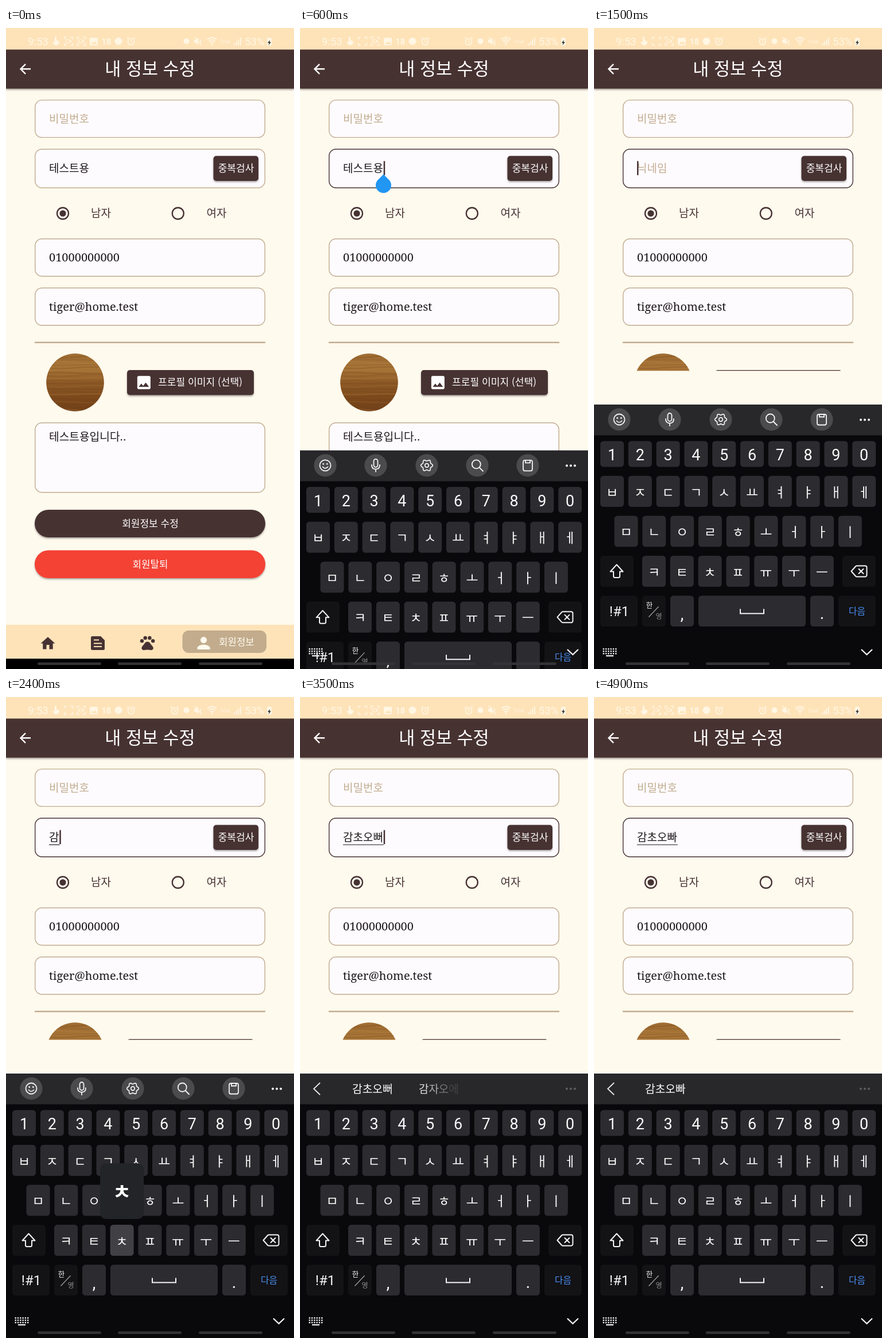
An HTML page for the animation above (5 s loop, 502 by 1115 pixels).

```html
<!DOCTYPE html>
<html lang="ko">
<head>
<meta charset="utf-8">
<title>내 정보 수정</title>
<style>
html, body { margin: 0; width: 100%; height: 100%; overflow: hidden; background: #fffaee; }
svg { display: block; width: 100%; height: 100%; }
text { font-family: "Noto Sans CJK KR", "Noto Sans CJK", sans-serif; font-weight: 500; white-space: pre; }
.num { font-family: Roboto, sans-serif; font-weight: 400; }
.serif { font-family: "Noto Serif", serif; font-weight: 400; }
.key { font-weight: 400; }
</style>
</head>
<body>
<svg id="stage" viewBox="0 0 502 1115">
<defs>
  <filter id="soft" x="-10%" y="-30%" width="120%" height="170%">
    <feDropShadow dx="0" dy="2" stdDeviation="1.8" flood-color="#000" flood-opacity=".35"/>
  </filter>
  <linearGradient id="wood" x2="0" y2="1">
    <stop offset="0" stop-color="#9c6a30"/><stop offset=".25" stop-color="#a87538"/>
    <stop offset=".5" stop-color="#8d5a26"/><stop offset=".75" stop-color="#7d4a1c"/>
    <stop offset="1" stop-color="#704019"/>
  </linearGradient>
  <clipPath id="disc"><circle cx="120.5" cy="616.5" r="50.3"/></clipPath>
  <clipPath id="body"><rect id="bodyRect" y="0" width="502" height="1115"/></clipPath>
</defs>
</svg>
<script>
const LOOP = 5000, STEP = 100;
const BROWN = '#463233', TAN = '#c1ac8f', SAND = '#fee3b9', PALE = '#fff6e4', INK = '#1c1819';
const KEY = '#2c2b2f', DARK = '#131215', LIT = '#414045';
const stage = document.getElementById('stage');
const $ = id => document.getElementById(id);

const rect = (x, y, w, h, r, fill, more = '') =>
  `<rect x="${x}" y="${y}" width="${w}" height="${h}" rx="${r}" fill="${fill}" ${more}/>`;
const circle = (x, y, r, fill, more = '') => `<circle cx="${x}" cy="${y}" r="${r}" fill="${fill}" ${more}/>`;
const line = (d, color, w = 2, more = '') =>
  `<path d="${d}" fill="none" stroke="${color}" stroke-width="${w}" ${more}/>`;
const shape = (d, fill, more = '') => `<path d="${d}" fill="${fill}" ${more}/>`;
// Text placed by the middle of its glyphs
const text = (x, cy, s, size, fill, more = '') =>
  `<text x="${x}" y="${cy + size * .37}" font-size="${size}" fill="${fill}" ${more}>${s}</text>`;
const mid = (x, cy, s, size, fill, more = '') => text(x, cy, s, size, fill, 'text-anchor="middle" ' + more);
const group = (x, y, k, inner) => `<g transform="translate(${x} ${y}) scale(${k})">${inner}</g>`;
const ROUND = 'stroke-linecap="round" stroke-linejoin="round"';

function form() {
  const field = (y, h, id = '') =>
    rect(50.7, y, 400.6, h, 12, '#fefbff', `stroke="${TAN}" stroke-width="1.4" id="${id}"`);
  const button = (x, y, w, h, r, fill) => rect(x, y, w, h, r, fill, 'filter="url(#soft)"');
  const radio = (x, on) => circle(x, 322.5, 10, 'none', `stroke="${BROWN}" stroke-width="2.3"`) +
    (on ? circle(x, 322.5, 5.6, BROWN) : '');
  let grain = '';
  for (let i = 0; i < 22; i++) {
    const y = 568 + i * 4.6, bend = 3 * Math.sin(i * 1.7);
    grain += line(`M70 ${y} q25 ${bend} 50 0 t52 ${-bend / 2}`, i % 3 ? '#6b3d16' : '#b9854a',
      1 + i % 2, 'opacity=".28"');
  }
  return `<g clip-path="url(#body)">` +
    field(125.4, 65) + text(75, 157.5, '비밀번호', 19, TAN) +
    field(210.8, 67.2, 'nickBox') +
    `<g id="nick"></g>` +
    button(361.5, 222.5, 78.5, 43.5, 5, BROWN) + mid(401, 244, '중복검사', 17, '#fff') +
    radio(99, true) + text(148, 322, '남자', 19, BROWN) +
    radio(299.8) + text(349.5, 322, '여자', 19, BROWN) +
    field(366.8, 65) + text(75, 399, '01000000000', 20, INK, 'class="serif"') +
    field(452.3, 65) + text(75, 484.5, 'tiger@home.test', 20, INK, 'class="serif"') +
    line('M50 547H452', TAN, 2.6) +
    circle(120.5, 616.5, 50.3, 'url(#wood)') + `<g clip-path="url(#disc)">${grain}</g>` +
    button(211, 595, 221, 43.5, 5, BROWN) +
    group(225, 601.3, 1.28, rect(3, 3, 18, 18, 2, '#fff') + shape('M5 18l3.5-4.5 2.5 3 3.5-4.5 4.5 6z', BROWN)) +
    text(265, 616, '프로필 이미지 (선택)', 17.1, '#fff') +
    field(686.8, 121) + text(75, 711, '테스트용입니다..', 19.2, INK) +
    button(50, 838, 402, 48, 24, BROWN) + mid(251.5, 862, '회원정보 수정', 17, '#fff') +
    button(50, 908.5, 402, 48.5, 24, '#f44336') + mid(251.5, 932.5, '회원탈퇴', 16.8, '#fff') +
    `</g>` +
    `<g id="handle">${shape('M145.5 254.4L155 264A13.5 13.5 0 1 1 136 264Z', '#2196f3')}</g>`;
}

function tabs() {
  const paw = [[4.5, 9.5], [9, 5.5], [15, 5.5], [19.5, 9.5]].map(p => circle(...p, 2.5, BROWN)).join('') +
    shape('M12 10.5c3 0 3.600 2.400 5.300 4.300s2.900 3 2.600 4.900c-.6 2.100-2 2.500-4 2.200q-3.900-.7-7.800 0c-2 .3-3.400-.1-4-2.200c-.3-1.900 .9-3 2.600-4.900s2.300-4.300 5.300-4.300z', BROWN);
  return `<g id="tabs">` + rect(0, 1038, 502, 59, 0, SAND) +
    group(58, 1055.4, 1.25, shape('M10 20v-6h4v6h5v-8h3L12 3 2 12h3v8z', BROWN)) +
    shape('M150.500 1058H165l7 7v14.500a2.500 2.500 0 0 1-2.500 2.500h-19a2.500 2.500 0 0 1-2.500-2.500v-19a2.500 2.500 0 0 1 2.500-2.500z', BROWN) +
    line('M153 1064.500h9M153 1070.500h14M153 1076h14', SAND, 2.2) +
    group(231.2, 1054, 1.28, paw) +
    rect(307.5, 1048, 146.5, 39, 11, '#c2ac8d') +
    group(328, 1053.5, 1.38, circle(12, 8, 4, '#fffaee') + shape('M4 20v-2c0-2.700 5.300-4 8-4s8 1.300 8 4v2z', '#fffaee')) +
    text(371, 1067.5, '회원정보', 16.8, '#fffaee') + rect(0, 1097, 502, 18, 0, '#000') + `</g>`;
}

function header() {
  const frame = x => line(`M${x - 7} 20v-4h4M${x + 3} 16h4v4M${x + 7} 26v4h-4M${x - 3} 30h-4v-4`, PALE, 1.4);
  const cam = x => rect(x - 4, 20, 6, 6, 1, 'none', `stroke="${PALE}" stroke-width="1.2"`) +
    shape(`M${x + 2} 23l3-2v4z`, PALE);
  const alarm = x => circle(x, 24, 5.5, 'none', `stroke="${PALE}" stroke-width="1.6"`) +
    line(`M${x} 21v3l2 1.500M${x - 7} 19l3-3M${x + 7} 19l-3-3`, PALE, 1.4);
  let bars = '';
  for (let i = 0; i < 4; i++) bars += rect(397 + i * 3.6, 27 - i * 3.4, 2, 3 + i * 3.4, 0, PALE);
  return rect(0, 37, 502, 68.5, 0, BROWN, 'filter="url(#soft)"') + rect(0, 0, 502, 37.5, 0, SAND) +
    text(38, 23.3, '9:53', 18.5, PALE, 'class="num"') +
    shape('M85 16q2-2 3 0v5l4 2q2 2 0 5l-3 2h-4l-4-5 4-1z', PALE) +
    frame(109) + `<g id="rec">${cam(109)}</g>` + frame(131) + cam(131) +
    rect(146, 17, 14, 13, 2, PALE) + shape('M148 28l3.500-4 2.500 2 2-3 3 5z', SAND) +
    text(166.5, 23.5, '18', 14.5, PALE, 'class="num" style="font-weight:700"') +
    circle(196, 23, 6.5, PALE) + alarm(218) +
    `<g id="alarm">${alarm(294)}</g>` + circle(314.5, 23, 5, PALE) +
    shape('M328 20.500h3l4-4v13l-4-4h-3z', PALE) + line('M329 16l12 14M338 20q3 3 0 6', PALE, 1.5) +
    line('M351 20q8-7 16 0M353.500 23q5.500-5 11 0M356 26q3-3 6 0', PALE, 1.8) + circle(359, 28.5, 1.5, PALE) +
    text(373, 23.5, '1/ıııl', 9, PALE, 'class="num"') + bars +
    text(416, 23.3, '53%', 18.5, PALE, 'class="num"') +
    rect(455, 17, 8, 13.5, 2, PALE) + shape('M460 21l-4 5h2.500l-1 4 4.500-5.500h-2.500z', '#333') +
    line('M43 71.300H26M34 62.800l-8.500 8.500 8.500 8.500', '#fff', 2.4) +
    mid(251, 71, '내 정보 수정', 30.5, '#fff');
}

// Keyboard
const PITCH = 48.8;
const keys = {};
const TWIN = { 'ㅂ': 'ㅃ', 'ㅈ': 'ㅉ', 'ㄷ': 'ㄸ', 'ㄱ': 'ㄲ', 'ㅅ': 'ㅆ', 'ㅐ': 'ㅒ', 'ㅔ': 'ㅖ' };

function keyboard() {
  const key = (name, x, y, w, h, fill, inner) => {
    keys[name] = { x: x + w / 2, y, fill };
    return rect(x, y, w, h, 5.5, fill, `id="k${name}"`) + inner;
  };
  const row = (chars, x0, y, h, cls, size) => [...chars].map((c, i) => {
    const x = x0 + i * PITCH;
    return key(c, x, y, 41, h, KEY, mid(x + 20.5, y + h / 2 + 1, c, size, '#fafafa', `class="${cls}" id="t${c}"`));
  }).join('');
  let gear = '';
  for (let i = 0; i < 60; i++) {
    const a = i * Math.PI / 30, r = 9 + 1.3 * Math.cos(6 * a + Math.PI);
    gear += (i ? 'L' : 'M') + (221 + r * Math.sin(a)).toFixed(1) + ' ' + (681 - r * Math.cos(a)).toFixed(1);
  }
  const W = '#f4f4f4';
  const tools = [44, 132, 221, 309, 397].map(x => circle(x, 681, 19.6, '#4b4a4d')).join('') +
    circle(44, 681, 9.5, 'none', `stroke="${W}" stroke-width="1.8"`) + circle(40.7, 678.5, 1.4, W) +
    circle(47.3, 678.5, 1.4, W) + line('M39.500 683.500q4.500 5 9 0', W, 1.7, ROUND) +
    rect(128.5, 670, 7, 14, 3.5, 'none', `stroke="${W}" stroke-width="1.8"`) +
    line('M125 680q0 7.500 7 7.500t7-7.500M132 688v4', W, 1.8, ROUND) +
    line(gear + 'Z', W, 1.7) + circle(221, 681, 3.3, 'none', `stroke="${W}" stroke-width="1.7"`) +
    circle(307.3, 679, 7.5, 'none', `stroke="${W}" stroke-width="1.8"`) + line('M313 685l6 6', W, 1.9, ROUND) +
    rect(389, 672, 16, 18.5, 3, 'none', `stroke="${W}" stroke-width="1.8"`) +
    line('M393 672v4.500h8V672', W, 1.8);
  const dots = [465, 472, 479].map(x => circle(x, 681.5, 2, '#fff')).join('');
  return `<g id="kb">` + rect(0, 655, 502, 460, 0, '#09080b') + rect(0, 655, 502, 53.5, 0, '#28272a') +
    `<g id="tools">${tools}</g><g id="dots">${dots}</g>` +
    `<g id="hints">${line('M35 671l-11 10.500 11 10.500', '#e8e8e8', 1.8)}` +
    `<g id="hint1"></g><g id="hint2"></g></g>` +
    row('1234567890', 11, 718.5, 45, 'num', 27) +
    row('ㅂㅈㄷㄱㅅㅛㅕㅑㅐㅔ', 11, 779, 54, 'key', 23) +
    row('ㅁㄴㅇㄹㅎㅗㅓㅏㅣ', 35.5, 848.5, 54, 'key', 23) +
    key('shift', 11, 918, 58, 54, DARK,
      line('M39.500 933.500L50.500 945.500H45V953.500a2.500 2.500 0 0 1-2.500 2.500h-6a2.500 2.500 0 0 1-2.500-2.500V945.500H28.500Z', W, 2, ROUND + ' id="arrow"')) +
    row('ㅋㅌㅊㅍㅠㅜㅡ', 84, 918, 54, 'key', 23) +
    key('del', 433, 918, 58, 54, DARK,
      line('M448.500 945l7.500-8.500q1-1 2.500-1h14a3 3 0 0 1 3 3v13a3 3 0 0 1-3 3h-14q-1.500 0-2.500-1zM461.500 941l8 8m0-8l-8 8', W, 2, ROUND)) +
    key('sym', 11, 987.5, 65, 53.5, DARK, mid(44, 1014.5, '!#1', 24, W, 'class="num"')) +
    key('lang', 84, 987.5, 41, 53.5, DARK, mid(96.5, 1004, '한', 12.5, W) +
      line('M95.500 1024.500l17-18', '#aaa', 1.2) + mid(113, 1023, '영', 12.5, '#8a8a8c')) +
    key(',', 133, 987.5, 41, 53.5, KEY, mid(153.5, 1018, ',', 30, W, 'class="num"')) +
    key('space', 182, 987.5, 187, 53.5, KEY, line('M255 1010.500v8h41v-8', W, 2)) +
    key('.', 377, 987.5, 41, 53.5, KEY, mid(397.5, 1017, '.', 30, W, 'class="num"')) +
    key('next', 426, 987.5, 65, 53.5, DARK, mid(458.5, 1014.5, '다음', 15.8, '#4a90f5', 'class="key"')) +
    `<g id="pop"></g></g>`;
}

function navigation() {
  let grid = '';
  for (let j = 0; j < 3; j++)
    for (let i = 0; i < 6; i++) grid += rect(15.5 + i * 4.3, 1079 + j * 4, 2.4, 2.4, 0, '#eee');
  grid += rect(21, 1091, 13, 2.2, 0, '#eee');
  return `<g id="imeNav">${grid}${line('M466 1081l9.500 9 9.500-9', '#fff', 2.2)}</g>` +
    [55, 195, 336].map(x => rect(x, 1103.5, 111, 4.6, 2.3, '#343336')).join('');
}

stage.insertAdjacentHTML('beforeend',
  rect(0, 0, 502, 1115, 0, '#fffaee') + form() + tabs() + header() + keyboard() + navigation());

// [time, text]
const edits = [[0, '테스트용'], [900, '테스트'], [1100, '테스'], [1300, '테'], [1400, ''],
  [2000, 'ㄱ'], [2200, '가'], [2300, '감'], [2500, '감ㅊ'], [2600, '감초'], [2800, '감총'], [3000, '감초오'],
  [3300, '감초오ㅃ'], [3500, '감초오뻐'], [3900, '감초오ㅃ'], [4400, '감초오빠']];
// [down, up, key]
const presses = [[800, 1400, 'del'], [1900, 2000, 'ㄱ'], [2100, 2200, 'ㅏ'], [2200, 2300, 'ㅁ'], [2400, 2500, 'ㅊ'],
  [2500, 2600, 'ㅗ'], [2700, 2800, 'ㅇ'], [2900, 3000, 'ㅗ'], [3100, 3200, 'shift'], [3200, 3300, 'ㅂ'],
  [3400, 3500, 'ㅓ'], [3800, 3900, 'del'], [4300, 4400, 'ㅏ']];
const FOCUS = 400, SLIDE = 425, SLIDE_TIME = 300, RESIZE = 900, HINTS = 2500;

const show = (id, on) => $(id).setAttribute('display', on ? 'inline' : 'none');
const clamp = (v, a = 0, b = 1) => Math.min(b, Math.max(a, v));

function drawNick(t, value, since) {
  const end = 75 + value.length * 17.48;
  const composing = t >= 2000;
  const blink = Math.floor((t - Math.max(since, FOCUS)) / 500) % 2 === 0;
  let out = value ? text(75, 243.5, value, 19, INK) : text(75, 243.5, '닉네임', 19, TAN);
  if (composing) out += line(`M75 257H${end + 1}`, INK, 1.2);
  if (t >= FOCUS && blink) out += rect(value ? end + .8 : 75, 231.5, 2.5, 24.5, 0, BROWN);
  $('nick').innerHTML = out;
  $('nickBox').setAttribute('stroke', t >= FOCUS ? BROWN : TAN);
  show('handle', t >= FOCUS && t < 900);
}

function drawKeys(t) {
  const shifted = t >= 3100 && t < 3300;
  for (const c in TWIN) $('t' + c).textContent = shifted ? TWIN[c] : c;
  $('arrow').setAttribute('fill', shifted ? '#f4f4f4' : 'none');
  const down = presses.find(p => t >= p[0] && t < p[1]);
  for (const name in keys) $('k' + name).setAttribute('fill', down && down[2] === name ? LIT : keys[name].fill);
  let pop = '';
  if (down && down[2].length === 1) {
    const { x, y } = keys[down[2]], px = clamp(x, 49, 453);
    const c = shifted ? TWIN[down[2]] || down[2] : down[2];
    pop = rect(px - 38, y - 107, 76, 97, 10, '#232427') +
      mid(px, y - 57, c, 35, '#fff', 'style="font-weight:700"');
  }
  $('pop').innerHTML = pop;
}

function drawHints(t, value) {
  const on = t >= HINTS;
  show('tools', !on);
  show('hints', on);
  $('dots').setAttribute('opacity', on ? .25 : 1);
  if (!on) return;
  const two = t >= 3400 && t < 3900;
  $('hint1').innerHTML = text(two ? 91 : 89, 682, value, 19.2, '#fff', 'class="key"');
  const sweep = (t - 3400) / 100;
  $('hint2').innerHTML = two ? [...'감자오에'].map((c, i) =>
    text(207 + i * 17.4, 682, c, 19, '#fff', `class="key" opacity="${clamp(sweep * .85 - i * .24)}"`)).join('') : '';
}

function update(t) {
  const [since, value] = edits.filter(e => e[0] <= t).pop();
  const rest = 1 - clamp((t - SLIDE) / SLIDE_TIME);
  $('kb').setAttribute('transform', `translate(0 ${460 * rest * rest})`);
  show('kb', rest < 1);
  show('imeNav', rest < 1);
  show('tabs', t < RESIZE);
  $('bodyRect').setAttribute('height', t >= RESIZE ? 596.3 : 1115);
  show('alarm', t >= 300);
  show('rec', t < 300 || t >= 4600);
  drawNick(t, value, since);
  drawKeys(t);
  drawHints(t, value);
}

let last = -1;
const start = performance.now();
function tick() {
  const t = Math.floor((performance.now() - start) % LOOP / STEP) * STEP;
  if (t !== last) update(last = t);
  requestAnimationFrame(tick);
}
update(0);
tick();
</script>
</body>
</html>
```
